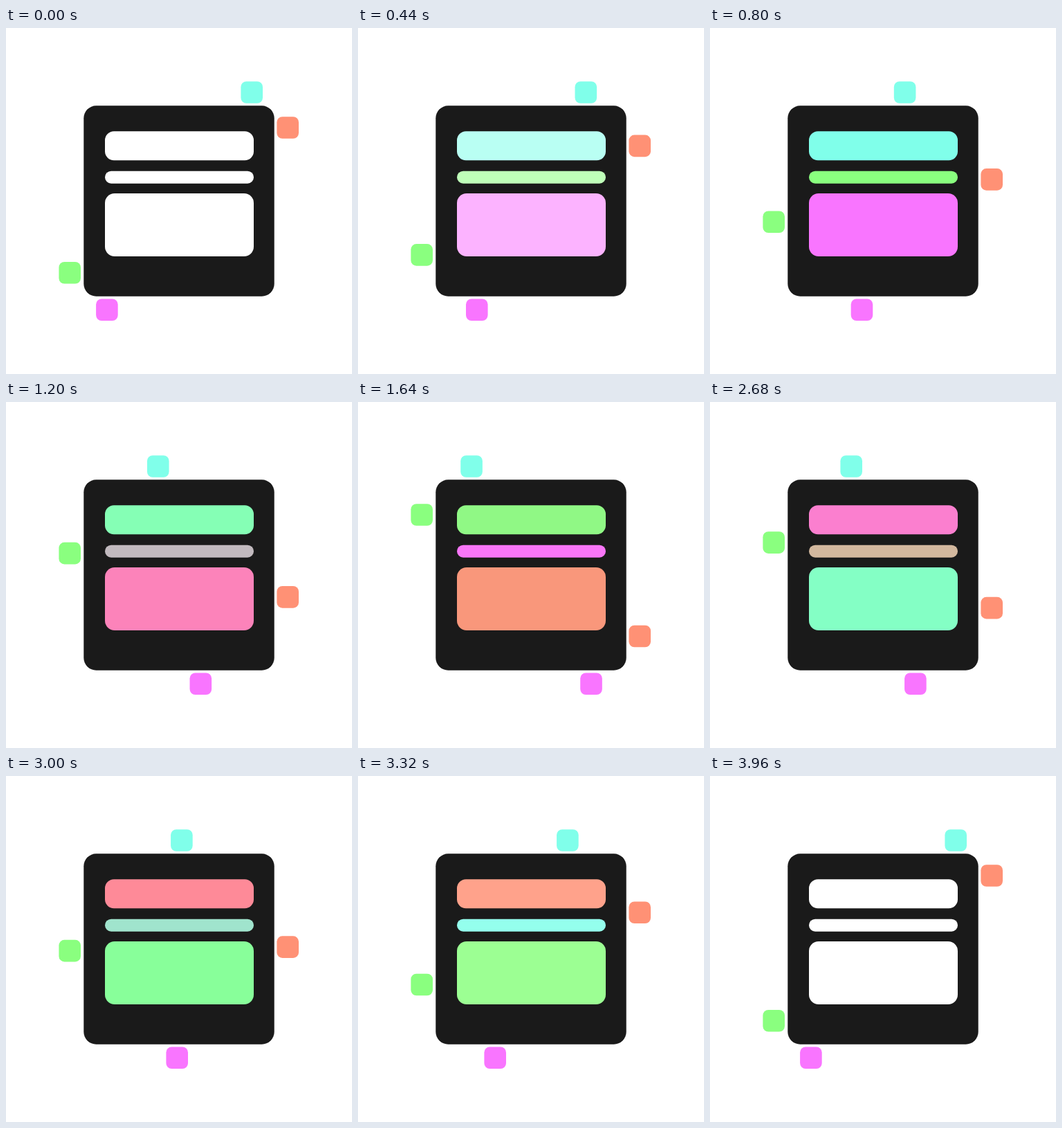
These frames come from a looping animation (500 px wide and 500 px high, 4040 ms). An HTML page:

```html
<!DOCTYPE html>
<html lang="en">
<head>
<meta charset="utf-8">
<title>Layout blocks</title>
<style>
  html, body { margin: 0; width: 100%; height: 100%; overflow: hidden; background: #fff; }
  svg { display: block; width: 100%; height: 100%; }
</style>
</head>
<body>
<svg viewBox="0 0 500 500">
  <rect x="112.3" y="112.3" width="275.4" height="275.4" rx="18" fill="#1a1a1a"/>
  <g id="bars">
    <rect x="143" y="149.3" width="215" height="42" rx="13"/>
    <rect x="143" y="206.7" width="215" height="18" rx="9"/>
    <rect x="143" y="239" width="215" height="91" rx="14"/>
  </g>
  <g id="chips"></g>
</svg>
<script>
  const LOOP = 4040, STEP = 40, TURN = 2000, END = 3960, FADE = 800, SIZE = 31.6;

  const white = [255, 255, 255];
  const cyan = [128, 255, 234];
  const green = [138, 255, 127];
  const pink = [249, 117, 255];
  const coral = [255, 145, 117];

  const barColors = [
    [white, cyan, green, pink, coral, white],
    [white, green, pink, coral, cyan, white],
    [white, pink, coral, cyan, green, white]
  ];

  // Centre at rest and travel to the far end of each side
  const chips = [
    { color: cyan, x: 355.2, y: 93, dx: -209, dy: 0 },
    { color: coral, x: 407.2, y: 144, dx: 0, dy: 212.7 },
    { color: pink, x: 145.9, y: 407.2, dx: 209, dy: 0 },
    { color: green, x: 92.2, y: 353.7, dx: 0, dy: -208.5 }
  ];

  const rgb = c => `rgb(${c.map(Math.round).join(',')})`;
  const mix = (a, b, k) => a.map((v, i) => v + (b[i] - v) * k);
  const ease = k => k * k * (3 - 2 * k);

  const bars = [...document.querySelectorAll('#bars rect')];
  for (const chip of chips) {
    chip.el = document.createElementNS('http://www.w3.org/2000/svg', 'rect');
    const attrs = { width: SIZE, height: SIZE, rx: 8, fill: rgb(chip.color) };
    for (const name in attrs) chip.el.setAttribute(name, attrs[name]);
    document.getElementById('chips').append(chip.el);
  }

  function draw(t) {
    const travel = t < TURN ? ease(t / TURN) : 1 - ease((t - TURN) / (END - TURN));
    for (const { el, x, y, dx, dy } of chips) {
      el.setAttribute('x', x + dx * travel - SIZE / 2);
      el.setAttribute('y', y + dy * travel - SIZE / 2);
    }

    const stage = Math.min(Math.floor(t / FADE), 4);
    const from = stage * FADE;
    const to = Math.min(from + FADE, END);
    bars.forEach((bar, i) => {
      const [a, b] = barColors[i].slice(stage, stage + 2);
      bar.setAttribute('fill', rgb(mix(a, b, (t - from) / (to - from))));
    });
  }

  const start = performance.now();
  function tick() {
    const t = (performance.now() - start) % LOOP;
    draw(Math.min(Math.floor(t / STEP) * STEP, END));
    requestAnimationFrame(tick);
  }
  tick();
</script>
</body>
</html>
```
